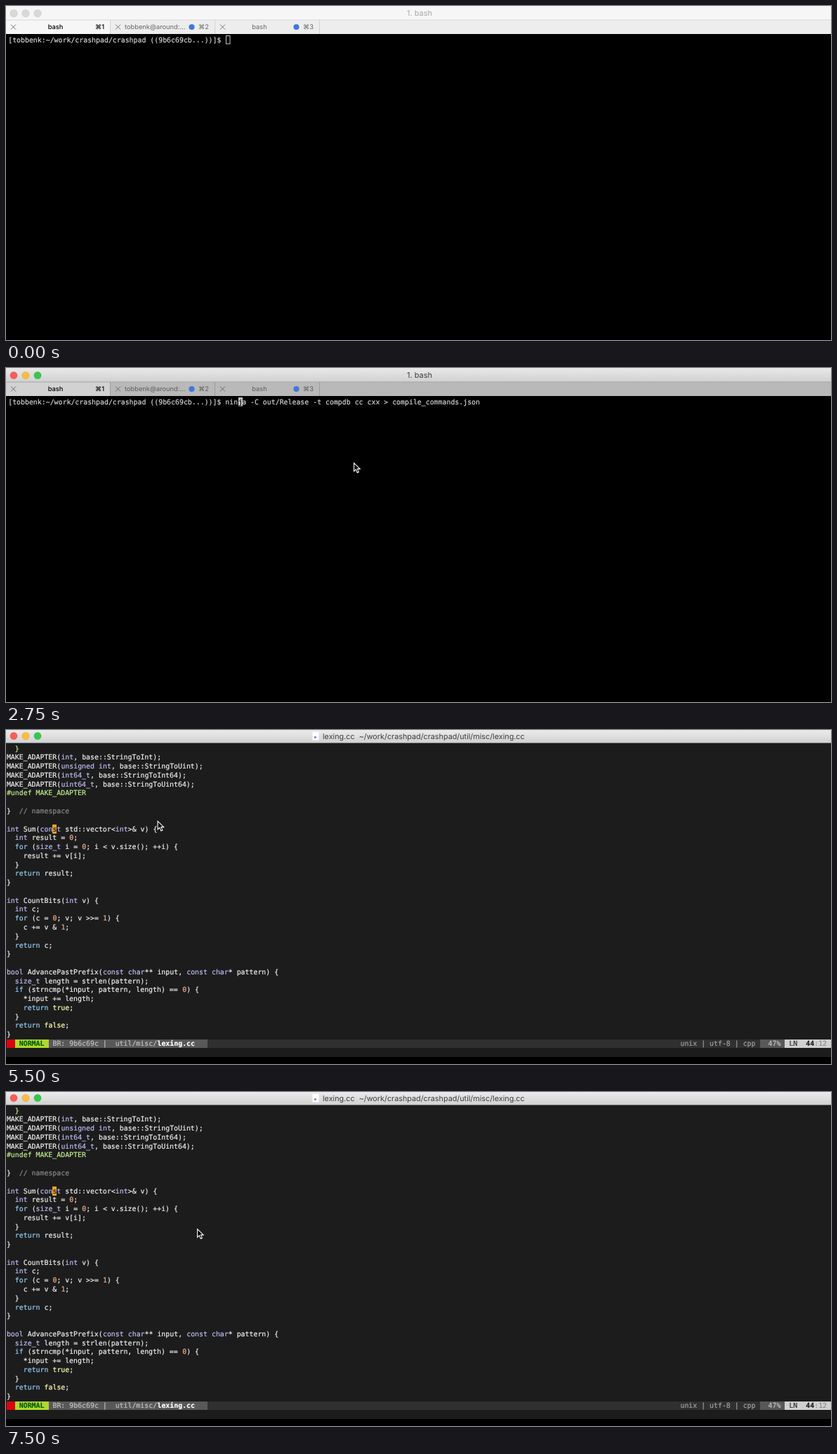
Recreate the animation shown at these times as an HTML page with a canvas. Size 1175 by 477 pixels, loop 8000 ms.

```html
<!DOCTYPE html>
<html lang="en">
<head>
<meta charset="utf-8">
<title>Terminal session</title>
<style>
html, body { margin: 0; width: 100%; height: 100%; overflow: hidden; background: #000; }
canvas { display: block; }
</style>
</head>
<body>
<canvas id="stage" width="1175" height="477"></canvas>
<script>
const W = 1175, H = 477, LOOP = 8000;
const CELL = 5.96, ROW = 12.77;
const MONO = '"DejaVu Sans Mono", monospace';
const SANS = 'Inter, "DejaVu Sans", sans-serif';
const ctx = document.getElementById('stage').getContext('2d');

const PROMPT = '[tobbenk:~/work/crashpad/crashpad ((9b6c69cb...))]$ ';
const COMMAND = 'ninja -C out/Release -t compdb cc cxx > compile_commands.json';
const CODE = `  }
MAKE_ADAPTER(int, base::StringToInt);
MAKE_ADAPTER(unsigned int, base::StringToUint);
MAKE_ADAPTER(int64_t, base::StringToInt64);
MAKE_ADAPTER(uint64_t, base::StringToUint64);
#undef MAKE_ADAPTER

}  // namespace

int Sum(const std::vector<int>& v) {
  int result = 0;
  for (size_t i = 0; i < v.size(); ++i) {
    result += v[i];
  }
  return result;
}

int CountBits(int v) {
  int c;
  for (c = 0; v; v >>= 1) {
    c += v & 1;
  }
  return c;
}

bool AdvancePastPrefix(const char** input, const char* pattern) {
  size_t length = strlen(pattern);
  if (strncmp(*input, pattern, length) == 0) {
    *input += length;
    return true;
  }
  return false;
}`.split('\n');

const SYNTAX = [
  [/\b\d\b/g, '#eeb08c'],
  [/\b(true|false)\b/g, '#ffffb8'],
  [/\b(for|if|return)\b/g, '#96cdf6'],
  [/\b(unsigned|u?int64_t|size_t|int|bool|char|const)\b/g, '#bcbcf6'],
  [/\/\/.*/g, '#8a8a8a'],
  [/#undef.*/g, '#c2f090']
];

function rect(x, y, w, h, color) {
  ctx.fillStyle = color;
  ctx.fillRect(x, y, w, h);
}

function disc(x, y, r, color, rim) {
  ctx.beginPath();
  ctx.arc(x, y, r, 0, 7);
  ctx.fillStyle = color;
  ctx.fill();
  if (rim) {
    ctx.strokeStyle = rim;
    ctx.lineWidth = 0.6;
    ctx.stroke();
  }
}

function text(s, x, y, color, font, align = 'left') {
  ctx.font = font;
  ctx.textAlign = align;
  ctx.fillStyle = color;
  ctx.fillText(s, x, y);
}

// A hairline outline gives the terminal face its slightly heavier weight.
function mono(s, x, y, color, weight = '') {
  text(s, x, y, color, `${weight} 9.9px ${MONO}`);
  ctx.strokeStyle = color;
  ctx.lineWidth = 0.2;
  ctx.strokeText(s, x, y);
}

function shade(h, top, bottom) {
  const g = ctx.createLinearGradient(0, 0, 0, h);
  g.addColorStop(0, top);
  g.addColorStop(1, bottom);
  rect(0, 0, W, h, g);
}

function lights(y, active) {
  const colors = active ? ['#fc5b57', '#fdbb3f', '#34c84a'] : ['#d9d9d9', '#d9d9d9', '#d9d9d9'];
  colors.forEach((c, i) => disc(11 + 17 * i, y, 5.2, c, active ? '#0002' : '#c6c6c6'));
}

function pointer(x, y) {
  const p = new Path2D('M.6 .9V12.4L3.3 9.9L5.3 14.5L7.4 13.6L5.4 9.1H9.2Z');
  ctx.save();
  ctx.translate(x, y);
  ctx.fillStyle = '#000';
  ctx.strokeStyle = '#fff';
  ctx.lineWidth = 1.1;
  ctx.fill(p);
  ctx.stroke(p);
  ctx.restore();
}

function tab(i, active, hover) {
  const x = 149 * i, first = i === 0;
  const fill = active ? (first ? '#d2d2d2' : hover ? '#c6c6c6' : '#b9b9b9') : (first ? '#f6f6f6' : '#ededed');
  const ink = first ? '#000' : active ? '#5c5c5c' : '#666';
  rect(x, 20, 148, 20, fill);
  rect(x + 148, 20, 1, 20, active ? '#9c9c9c' : '#d2d2d2');

  ctx.strokeStyle = active ? '#6a6a6a' : '#777';
  ctx.lineWidth = 1;
  ctx.beginPath();
  ctx.moveTo(x + 7, 26.5);
  ctx.lineTo(x + 14, 33.5);
  ctx.moveTo(x + 14, 26.5);
  ctx.lineTo(x + 7, 33.5);
  ctx.stroke();

  const weight = first ? '500' : '400', font = `${weight} 9.3px ${SANS}`;
  if (i === 1) text('tobbenk@around:...', 169, 33.3, ink, font);
  else text('bash', first ? 70.5 : 361, 33.3, ink, font, 'center');
  text('⌘' + (i + 1), x + 140, 33.3, ink, font, 'right');
  if (!first) disc(x + 115.5, 30, 4.1, '#4076e0');
}

function terminal(t) {
  const active = t >= 1000;
  rect(0, 0, W, H, '#000');
  if (active) shade(20, '#e9e9e9', '#d0d0d0');
  else rect(0, 0, W, 20, '#f6f6f6');
  lights(10.5, active);
  text('1. bash', 589, 14.4, active ? '#3c3c3c' : '#a8a8a8', `11px ${SANS}`, 'center');
  rect(0, 20, W, 20, active ? '#b9b9b9' : '#ededed');
  for (let i = 0; i < 3; i++) tab(i, active, t >= 4500 && t < 4750);
  rect(0, 19.5, W, 1, active ? '#a6a6a6' : '#dadada');

  const ink = '#d2d2d2', left = 3.2, start = left + PROMPT.length * CELL;
  const typed = t < 1750 ? '' : t < 2750 ? 'nin' : COMMAND;
  mono(PROMPT + typed, left, 52, ink);
  if (t >= 4000) mono(PROMPT, left, 64.8, ink);

  if (!active) {
    ctx.strokeStyle = '#c7c7c7';
    ctx.lineWidth = 1;
    ctx.strokeRect(313.5, 42.5, 5.5, 11.5);
  } else {
    const x = t < 1750 || t >= 4000 ? start : t < 3500 ? start + 3 * CELL : left;
    rect(x, t < 3500 ? 42 : 54.7, CELL, 12.5, '#c7c7c7');
    if (t >= 2750 && t < 3500) mono('j', x, 52, '#000');
  }

  if (t >= 250 && t < 4500) pointer(495, 135);
  else if (t >= 4500 && t < 4750) pointer(330, 6);
}

const col = c => 0.9 + c * CELL;
const rowTop = r => 20.1 + r * ROW;

// Fills cells a to b of a row, on whole pixels.
function block(a, b, r, color) {
  const x = Math.round(col(a)), y = Math.round(rowTop(r));
  rect(x, y, Math.round(col(b)) - x, Math.round(rowTop(r + 1)) - y, color);
}

function put(s, c, r, color, weight) {
  mono(s, col(c), rowTop(r) + 9.5, color, weight);
}

function codeLine(line, r) {
  const colors = Array(line.length).fill(r ? '#f0f0f0' : '#c2f090');
  for (const [rule, color] of SYNTAX)
    for (const m of line.matchAll(rule)) colors.fill(color, m.index, m.index + m[0].length);
  for (let a = 0, b; a < line.length; a = b) {
    for (b = a + 1; b < line.length && colors[b] === colors[a];) b++;
    put(line.slice(a, b), a, r, colors[a]);
  }
}

function statusBar(down) {
  const r = 33;
  block(0, 197, r, '#303030');
  block(0, 2, r, '#d9060d');
  block(2, 10, r, '#b2d72c');
  block(10, 48, r, '#585858');
  block(180, 186, r, '#585858');
  block(186, 197, r, '#d0d0d0');
  put('NORMAL', 3, r, '#005f00', 'bold');
  put('BR: 9b6c69c |  util/misc/', 11, r, '#c2c2c2');
  put('lexing.cc', 36, r, '#fff', 'bold');
  put('unix | utf-8 | cpp', 161, r, '#a2a2a2');
  put(down ? '48%' : '47%', 182, r, '#c2c2c2');
  put('LN', 187, r, '#303030');
  put(down ? '45' : '44', 191, r, '#202020', 'bold');
  put(':12', 193, r, '#8a8a8a');
}

function editor(t) {
  const down = t >= 6500 && t < 7000 || t >= 7250 && t < 7500;
  rect(0, 0, W, H, '#000');
  rect(0, 18, W, 449, '#1c1c1c');
  CODE.forEach(codeLine);
  shade(18, '#ebebeb', '#d2d2d2');
  rect(0, 18, W, 1, '#7d7d7d');
  lights(8.5, true);
  rect(436.5, 3, 9, 11.5, '#fff');
  disc(440.5, 10.5, 1.7, '#7f8fd8');
  text('lexing.cc  ~/work/crashpad/crashpad/util/misc/lexing.cc', 451, 12.7, '#3c3c3c', `10.8px ${SANS}`);

  if (t < 6250 || t >= 6500) {
    const r = down ? 10 : 9;
    block(11, 12, r, '#f7a521');
    put(CODE[r][11], 11, r, '#1c1c1c');
  }
  statusBar(down);
  if (t < 5750) pointer(215.5, 129.5);
  else pointer(272, 195);
}

function frame(now) {
  const t = now % LOOP;
  ctx.textRendering = 'geometricPrecision';
  (t < 5500 ? terminal : editor)(t);
  requestAnimationFrame(frame);
}
requestAnimationFrame(frame);
</script>
</body>
</html>
```
